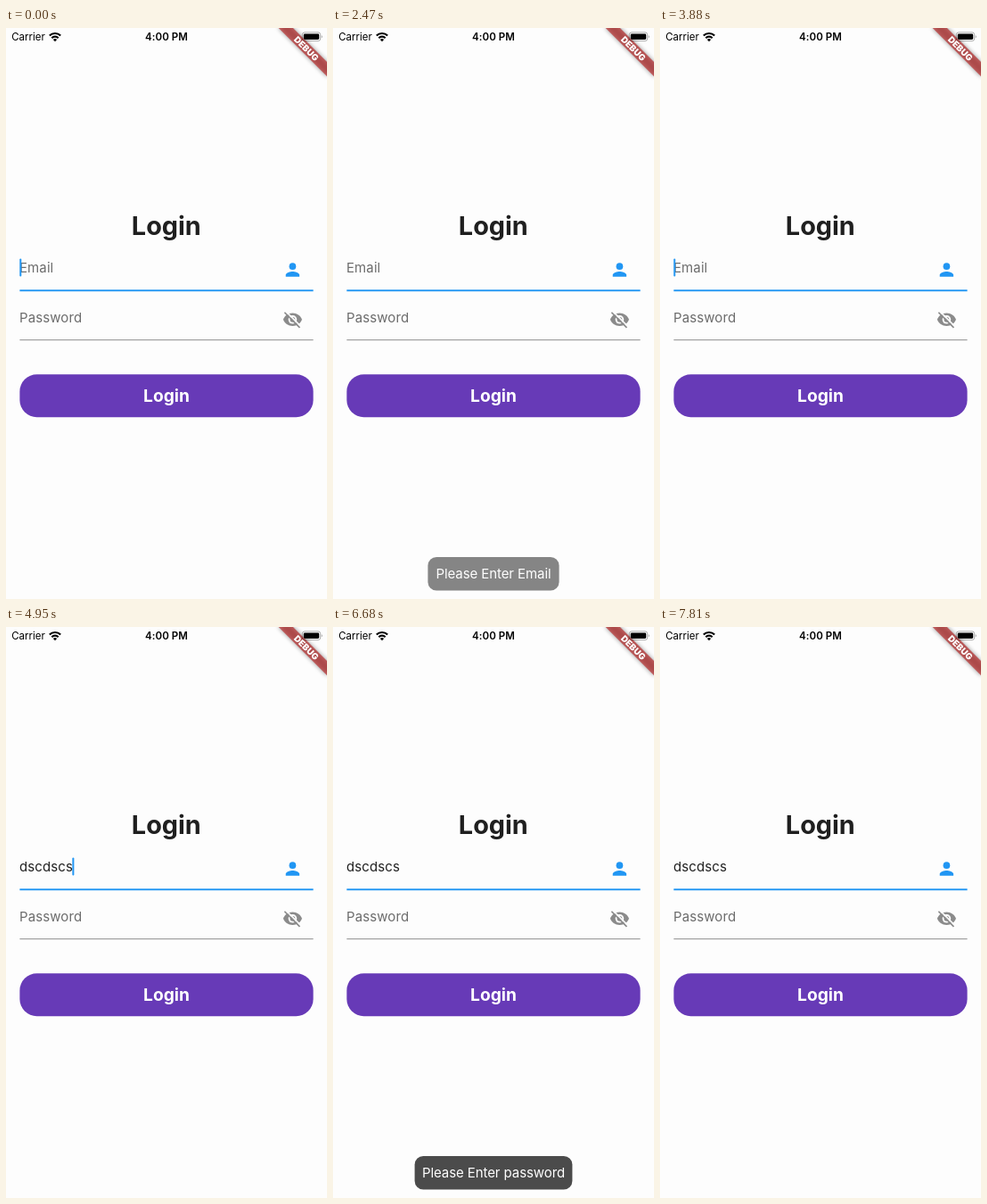
Animation of 360x640 px, one loop 8000 ms. Source, as an HTML page:

```html
<!DOCTYPE html>
<html lang="en">
<head>
<meta charset="utf-8">
<title>Login form</title>
<style>
  html, body { margin: 0; width: 100%; height: 100%; overflow: hidden; background: #fdfdfd; }
  svg { display: block; width: 360px; height: 640px; font-family: Inter, "Open Sans", sans-serif; }
  .mid { text-anchor: middle; }
  .field { font-size: 15px; letter-spacing: .1px; fill: #6c6c6c; }
  .status { font-size: 11.5px; fill: #000; }
  .toast text { font-size: 15px; letter-spacing: -.08px; fill: #fff; }
  .toast rect { fill: rgba(0, 0, 0, .7); }
  .bg { fill: #fdfdfd; }
  .blue { fill: #2196f3; }
</style>
</head>
<body>
<svg viewBox="0 0 360 640">
  <defs>
    <filter id="blur" x="-30%" y="-150%" width="160%" height="400%"><feGaussianBlur stdDeviation="2.8"/></filter>
    <filter id="soft" x="-50%" y="-80%" width="200%" height="260%"><feGaussianBlur stdDeviation="5"/></filter>
  </defs>
  <rect class="bg" width="360" height="640"/>

  <!-- form -->
  <text class="mid" x="179.8" y="231.7" font-size="28.8" font-weight="700" fill="#1f1f1f">Login</text>
  <text id="hint" class="field" x="15" y="274">Email</text>
  <text id="typed" class="field" x="15" y="274" style="fill:#222"></text>
  <rect id="caret" class="blue" y="258.4" width="2" height="20.2" rx="1"/>
  <rect class="blue" x="15.4" y="293.3" width="329.2" height="1.9"/>
  <g class="blue" transform="translate(309.9 259.5) scale(.96)">
    <circle cx="12" cy="8" r="4"/>
    <path d="M12 14c-2.67 0-8 1.34-8 4v2h16v-2c0-2.66-5.33-4-8-4z"/>
  </g>

  <text class="field" x="15" y="329.5">Password</text>
  <rect x="15.4" y="349.2" width="329.2" height=".96" fill="#8a8a8a"/>
  <g transform="translate(309.9 315.3) scale(.96)" fill="#8b8b8b">
    <path d="M1 12c1.73-4.39 6-7.5 11-7.5s9.27 3.11 11 7.5c-1.73 4.39-6 7.5-11 7.5s-9.27-3.11-11-7.5z"/>
    <circle class="bg" cx="12" cy="12" r="5"/>
    <circle cx="12" cy="12" r="3"/>
    <path d="M3.8 2.2 21.8 20.2" stroke="#fdfdfd" stroke-width="1.9"/>
    <path d="M2.6 3.6 20.4 21.4" stroke="#8b8b8b" stroke-width="1.8"/>
  </g>

  <rect x="15.4" y="388.2" width="329.2" height="48" rx="19.2" fill="#673ab7"/>
  <rect id="press" x="15.4" y="388.2" width="329.2" height="48" rx="19.2" fill="#fff"/>
  <text class="mid" x="180" y="419" font-size="19.2" font-weight="700" fill="#fff">Login</text>

  <!-- edit menu -->
  <g id="menu">
    <rect x="7.7" y="214" width="69" height="37" rx="7.7" opacity=".12" filter="url(#soft)"/>
    <rect x="7.7" y="214" width="69" height="37" rx="7.7" fill="#f7f7f7"/>
    <path d="M18.3 251h13.4l-6.7 6.5z" fill="#f7f7f7"/>
    <text class="mid" x="42.2" y="237.3" font-size="13.4">Paste</text>
  </g>

  <!-- toasts -->
  <g id="toast1" class="toast">
    <rect x="106.4" y="593" width="147.2" height="37.6" rx="9.6"/>
    <text class="mid" x="180" y="616.6">Please Enter Email</text>
  </g>
  <g id="toast2" class="toast">
    <rect x="91.6" y="593" width="176.8" height="37.6" rx="9.6"/>
    <text class="mid" x="180" y="616.6">Please Enter password</text>
  </g>

  <!-- ribbon -->
  <g transform="translate(360 0) rotate(45)">
    <rect x="-38.4" y="26.9" width="76.8" height="11.5" opacity=".4" filter="url(#blur)"/>
    <rect x="-38.4" y="26.9" width="76.8" height="11.5" fill="#b71c1c" opacity=".627"/>
    <text class="mid" y="36.2" font-size="9.8" font-weight="900" fill="#fff">DEBUG</text>
  </g>

  <!-- status bar -->
  <text class="status" x="6.2" y="14">Carrier</text>
  <g fill="none" stroke="#000" stroke-width="2.1">
    <path d="M48.8 8.6a8.8 8.8 0 0 1 12.4 0"/>
    <path d="M51.3 11.2a5.2 5.2 0 0 1 7.4 0"/>
    <path d="M55 15.2l-2.1-2.2a3 3 0 0 1 4.2 0z" fill="#000" stroke="none"/>
  </g>
  <text class="status mid" x="180" y="14" font-weight="600" letter-spacing=".1">4:00 PM</text>
  <rect x="332.3" y="4.9" width="20.4" height="9.6" rx="2.6" fill="none" stroke="#000" stroke-opacity=".35" stroke-width=".9"/>
  <rect x="333.8" y="6.4" width="17.4" height="6.6" rx="1.4"/>
  <path d="M353.8 8.2a1.7 1.7 0 0 1 0 3z" opacity=".4"/>
</svg>
<script>
  const LOOP = 8000;
  const BLINK = 1055;           // caret period
  const TAP_1 = 2270, TAP_2 = 5807;
  const MENU = 4330, TYPE = 4540, KEY = 68;
  const REBLINK = 5480;         // caret blinks again after typing
  const ENTRY = "dscdscs";

  const $ = id => document.getElementById(id);
  const fade = (id, value) => $(id).setAttribute("opacity", value);
  const ramp = (t, start, length) => Math.min(1, Math.max(0, (t - start) / length));

  function caretOpacity(t) {
    const start = t < MENU ? 200 : REBLINK;
    if (t < start) return 1;
    const phase = (t - start) % BLINK;
    return 1 - ramp(phase, 0, 140) + ramp(phase, 310, 210);
  }

  const flash = (t, tap) => t < tap ? 0 : .1 * (1 - ramp(t, tap, 200));
  const toast = (t, tap) => ramp(t, tap + 100, 150) - ramp(t, tap + 1455, 150);

  function draw(now) {
    const t = now % LOOP;
    fade("caret", caretOpacity(t));
    fade("press", flash(t, TAP_1) + flash(t, TAP_2));
    fade("toast1", toast(t, TAP_1));
    fade("toast2", toast(t, TAP_2));
    fade("menu", t < MENU ? 0 : 1 - ramp(t, TYPE, 150));
    fade("hint", 1 - ramp(t, TYPE, 110));

    const keys = Math.max(0, Math.floor((t - TYPE) / KEY) + 1);
    const typed = $("typed");
    typed.textContent = ENTRY.slice(0, keys);
    $("caret").setAttribute("x", keys ? 14.4 + typed.getComputedTextLength() : 15.3);
    requestAnimationFrame(draw);
  }
  draw(0);
</script>
</body>
</html>
```
